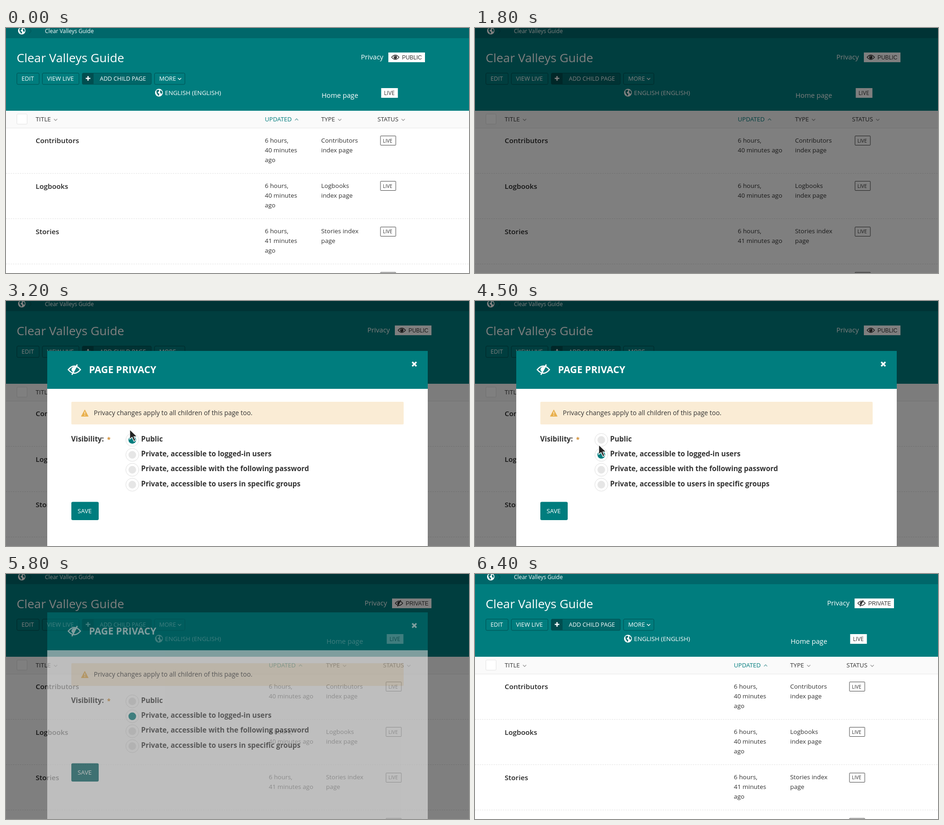
Animation, 999 px wide and 530 px high, one loop 7 s. Source, as an HTML page:

```html
<!DOCTYPE html>
<html lang="en">
<head>
<meta charset="utf-8">
<title>Page privacy</title>
<style>
html, body { margin: 0; width: 100%; height: 100%; overflow: hidden; background: #fff; }
svg { display: block; width: 999px; height: 530px; font-family: "Open Sans", sans-serif; fill: #333; }
.btn { fill: #007d7e; stroke: #004f51; }
.line { fill: none; stroke: #e3e3e3; stroke-dasharray: 3 2; }
.chev { fill: none; stroke-width: 1.3; }

/* Every state change is a hard cut on a 7 s loop. */
.anim { animation: 7s step-end infinite; }
#narrow { animation-name: narrow; }
#wide { animation-name: wide; }
.public { animation-name: before-save; }
.private { animation-name: after-save; }
#shade { animation-name: shade; }
#modal { animation-name: modal; }
#dot0 { animation-name: deselect; }
#dot1 { animation-name: select; }
#save { animation-name: press; }
#cursor { animation-name: cursor; }
#edge { animation-name: edge; }

@keyframes narrow { 0%, 88.57% { visibility: visible } 22.85% { visibility: hidden } }
@keyframes wide { 0%, 88.57% { visibility: hidden } 22.85% { visibility: visible } }
@keyframes before-save { 0% { opacity: 1 } 82.85%, 100% { opacity: 0 } }
@keyframes after-save { 0% { opacity: 0 } 82.85%, 100% { opacity: 1 } }
@keyframes shade {
  0% { opacity: 0 } 24.28% { opacity: .25 } 25.71% { opacity: .5 }
  85.71% { opacity: .39 } 87.14% { opacity: .1 } 88.57%, 100% { opacity: 0 }
}
@keyframes modal {
  0% { opacity: 0; transform: translateY(-60px) }
  27.14% { opacity: .6; transform: translateY(-40px) }
  28.57% { opacity: 1; transform: none }
  82.85% { opacity: .5; transform: translateY(-25px) }
  84.28%, 100% { opacity: 0; transform: translateY(-60px) }
}
@keyframes deselect { 0% { fill: #007d7e } 64.28%, 100% { fill: #e6e6e6 } }
@keyframes select { 0% { fill: #e6e6e6 } 64.28%, 100% { fill: #007d7e } }
@keyframes press { 0% { fill: #007d7e } 71.42%, 100% { fill: #006566 } }
@keyframes cursor {
  0% { transform: translate(1010px, 330px); animation-timing-function: steps(4) }
  5.71% { transform: translate(866px, 66px); animation-timing-function: steps(2) }
  8.57% { transform: translate(1010px, 40px) }
  34.28% { transform: translate(1010px, 190px); animation-timing-function: steps(4) }
  40% { transform: translate(440px, 260px); animation-timing-function: steps(4) }
  45.71% { transform: translate(267px, 278px); animation-timing-function: steps(5) }
  52.85% { transform: translate(267px, 311px) }
  67.14% { transform: translate(267px, 311px); animation-timing-function: steps(3) }
  71.42% { transform: translate(168px, 452px); animation-timing-function: steps(4) }
  77.14%, 100% { transform: translate(-40px, 500px) }
}
@keyframes edge { 0% { opacity: 0 } 77.14% { opacity: 1 } 82.85%, 100% { opacity: 0 } }
</style>
</head>
<body>
<svg viewBox="0 0 999 530">
  <defs>
    <g id="globe">
      <circle r="8.4" fill="#fff"/>
      <path d="M-5.5-4.5L-2-6.5L1-5L-.5-2.5L-3-1L-1.5 1.2L1 2.5L0 5L-1.5 7L-3 3.5L-5 1Z
               M3-5.5L6-3.5L7 0L5.5 2.5L3.5 1L2.5-2Z" fill="#00696b"/>
    </g>
    <g id="eye">
      <path d="M-8 0Q0-9.5 8 0Q0 9.5-8 0Z" fill="none" stroke="currentColor" stroke-width="1.4"/>
      <circle r="3.6" fill="currentColor"/>
      <path d="M-1.8-.3A1.8 1.8 0 0 1 0-2" fill="none" stroke="#fff" stroke-width=".8"/>
    </g>
    <g id="eye-off">
      <path d="M-8 0Q0-9.5 8 0Q0 9.5-8 0Z" fill="none" stroke="currentColor" stroke-width="1.5"/>
      <path d="M-3.4 1.4A3.6 3.6 0 0 1 2-3L-1.5 3.4Z" fill="currentColor"/>
      <path d="M3.8-6.8L-3.2 6.8" stroke="currentColor" stroke-width="1.7"/>
    </g>
  </defs>
  <g id="page"></g>
  <g id="narrow" class="anim"></g>
  <g id="wide" class="anim"></g>
  <rect id="shade" class="anim" width="999" height="530" fill="#000"/>
  <g id="modal" class="anim"></g>
  <circle id="edge" class="anim" cx="-4" cy="503" r="7" fill="#aaa" stroke="#555"/>
  <path id="cursor" class="anim" d="M0 0V21L5 16.6L9 25.5L12.7 23.8L9 15.4H16Z" fill="#222" stroke="#fff" stroke-width="1.4"/>
</svg>
<script>
const SITE = 'Clear Valleys Guide';
const ROWS = [['Contributors', 40, 'index page'], ['Logbooks', 40, 'index page'], ['Stories', 41, 'page']];
const STEP = 98.3;

const text = (x, y, size, str, attrs = '') => `<text x="${x}" y="${y}" font-size="${size}" ${attrs}>${str}</text>`;
const rect = (x, y, w, h, attrs = '') => `<rect x="${x}" y="${y}" width="${w}" height="${h}" ${attrs}/>`;
const icon = (name, x, y, scale = 1, color = '#333') =>
  `<use href="#${name}" transform="translate(${x} ${y}) scale(${scale})" color="${color}"/>`;
const chevron = (x, y, dir = 1, color = '#999') =>
  `<path class="chev" d="M${x - 3.5} ${y - 1.8 * dir}l3.5 ${3.6 * dir}l3.5 ${-3.6 * dir}" stroke="${color}"/>`;
const white = 'fill="#fff"';
const button = (x, w, label) =>
  rect(x + .5, 97.5, w, 24.5, 'rx="2.5" class="btn"') + text(x + 10.5, 114.3, 12.7, label, white);
const fill = (id, html) => { document.getElementById(id).innerHTML = html; };

function page() {
  return rect(0, 0, 999, 179, 'fill="#007d7e"') + rect(0, 0, 999, 22, 'fill="#00676a"')
    + icon('globe', 34, 6, .95)
    + '<path class="chev" d="M50 1l4.5 5.5l-4.5 5.5" stroke="#00595b"/>'
    + text(84, 11, 11.9, SITE, white)
    + text(23, 73.5, 26.2, SITE, white)
    + button(23, 48, 'EDIT') + button(78, 79, 'VIEW LIVE')
    + rect(164.5, 97.5, 149, 24.5, 'rx="2.5" fill="#006668" stroke="#004f51"')
    + rect(165, 98, 24, 23.5, 'fill="#004e50"')
    + '<path d="M172 109h10M177 104v10" stroke="#fff" stroke-width="2.6"/>'
    + text(202.5, 114.3, 12.5, 'ADD CHILD PAGE', white)
    + button(320, 65.5, 'MORE') + chevron(374.5, 110, 1, '#fff')
    + icon('globe', 330, 140) + text(343, 144.6, 13.3, 'ENGLISH (ENGLISH)', white)
    + rect(0, 179, 999, 37, 'fill="#fafafa"') + rect(0, 216, 999, 1, 'fill="#e8e8e8"')
    + rect(23.5, 186, 22, 22, 'rx="2" fill="#fff" stroke="#e3e3e3"')
    + text(64, 202.4, 13.3, 'TITLE') + chevron(107, 198.5)
    + ROWS.map(([name], i) => text(64, 249.2 + i * STEP, 15.2, name, 'font-weight="600" fill="#262626"')
      + `<path class="line" d="M0 ${Math.floor(314 + i * STEP) + .5}H999"/>`).join('');
}

function privacy(x, w, cls, label, eye) {
  return `<g class="anim ${cls}">` + text(x - 59.3, 67.8, 14.7, 'Privacy', white)
    + rect(x, 53, w, 21, white) + icon(eye, x + 15, 63.3)
    + text(x + 29.5, 67.5, 11.9, label, 'font-family="Liberation Sans, Arial, sans-serif"') + '</g>';
}

// Right-hand columns; the last one wraps "ago" when the scrollbar takes room.
function columns(right, updated, type, status, wrap) {
  const live = i => {
    const y = 233.5 + i * STEP;
    return rect(status + 6.5, Math.floor(y) + .5, 33, 20, 'rx="1" fill="#fff" stroke="#444"')
      + text(status + 11.8, y + 14, 10.4, 'LIVE');
  };
  return privacy(right - 79, 79, 'public', 'PUBLIC', 'eye')
    + privacy(right - 85, 85, 'private', 'PRIVATE', 'eye-off')
    + text(type + 1, 151.3, 14.7, 'Home page', white)
    + rect(status + 8, 130, 36, 21, white) + text(status + 14, 144.6, 11.8, 'LIVE')
    + text(updated, 202.4, 13.1, 'UPDATED', 'fill="#007d7e"') + chevron(updated + 68.5, 198, -1, '#6aa5a6')
    + text(type, 202.4, 13.2, 'TYPE') + chevron(type + 40, 198.5)
    + text(status, 202.4, 13.2, 'STATUS') + chevron(status + 55.5, 198.5)
    + ROWS.map(([name, min, rest], i) => {
      const y = 247.5 + i * STEP, long = name === 'Stories';
      return text(updated, y, 13.4, '6 hours,')
        + text(updated, y + 21.2, 13.4, `${min} minutes${wrap ? '' : ' ago'}`)
        + (wrap ? text(updated, y + 42.2, 13.4, 'ago') : '')
        + text(type, y, 13.4, long ? name + ' index' : name) + text(type, y + 21.2, 13.4, rest) + live(i);
    }).join('') + live(3);
}

function modal() {
  const bold = 'font-weight="700"';
  const choices = ['Public', 'Private, accessible to logged-in users',
    'Private, accessible with the following password', 'Private, accessible to users in specific groups'];
  return rect(89, 108, 821, 500, white) + rect(89, 108, 821, 82, 'fill="#007d7e"')
    + icon('eye-off', 147.5, 148.5, 1.65, '#fff')
    + text(179, 155.8, 20.9, 'PAGE PRIVACY', bold + ' ' + white)
    + '<path d="M876.5 132l9 9M885.5 132l-9 9" stroke="#fff" stroke-width="3.4"/>'
    + rect(141, 218, 717, 49, 'rx="2" fill="#faecd5"')
    + '<path d="M170 235.5L177.5 249.5H162.5Z" fill="#e9b04d" stroke="#e9b04d" stroke-linejoin="round"/>'
    + '<path d="M170 239.5v5M170 246v2" stroke="#faecd5" stroke-width="1.6"/>'
    + text(189.5, 247.4, 13.95, 'Privacy changes apply to all children of this page too.')
    + text(140.5, 303.6, 15.4, 'Visibility:', bold) + text(218, 304.5, 14, '*', bold + ' fill="#d08a2e"')
    + choices.map((label, i) => {
      const y = 300.5 + i * 32.3;
      return `<circle cx="272.5" cy="${y}" r="14" fill="#fff" stroke="#dedede"/>`
        + `<circle ${i < 2 ? `id="dot${i}" class="anim"` : ''} cx="272.5" cy="${y}" r="8.3" fill="#e6e6e6"/>`
        + text(291.5, y + 3.1, 15.4, label, bold);
    }).join('')
    + rect(141, 434.5, 59, 39.5, 'id="save" class="anim" rx="3"') + text(154.5, 459.2, 13.3, 'SAVE', white);
}

fill('page', page());
fill('narrow', columns(904, 558.5, 680, 801.5, true));
fill('wide', columns(918, 567, 690.5, 813.5, false));
fill('modal', modal());
</script>
</body>
</html>
```
